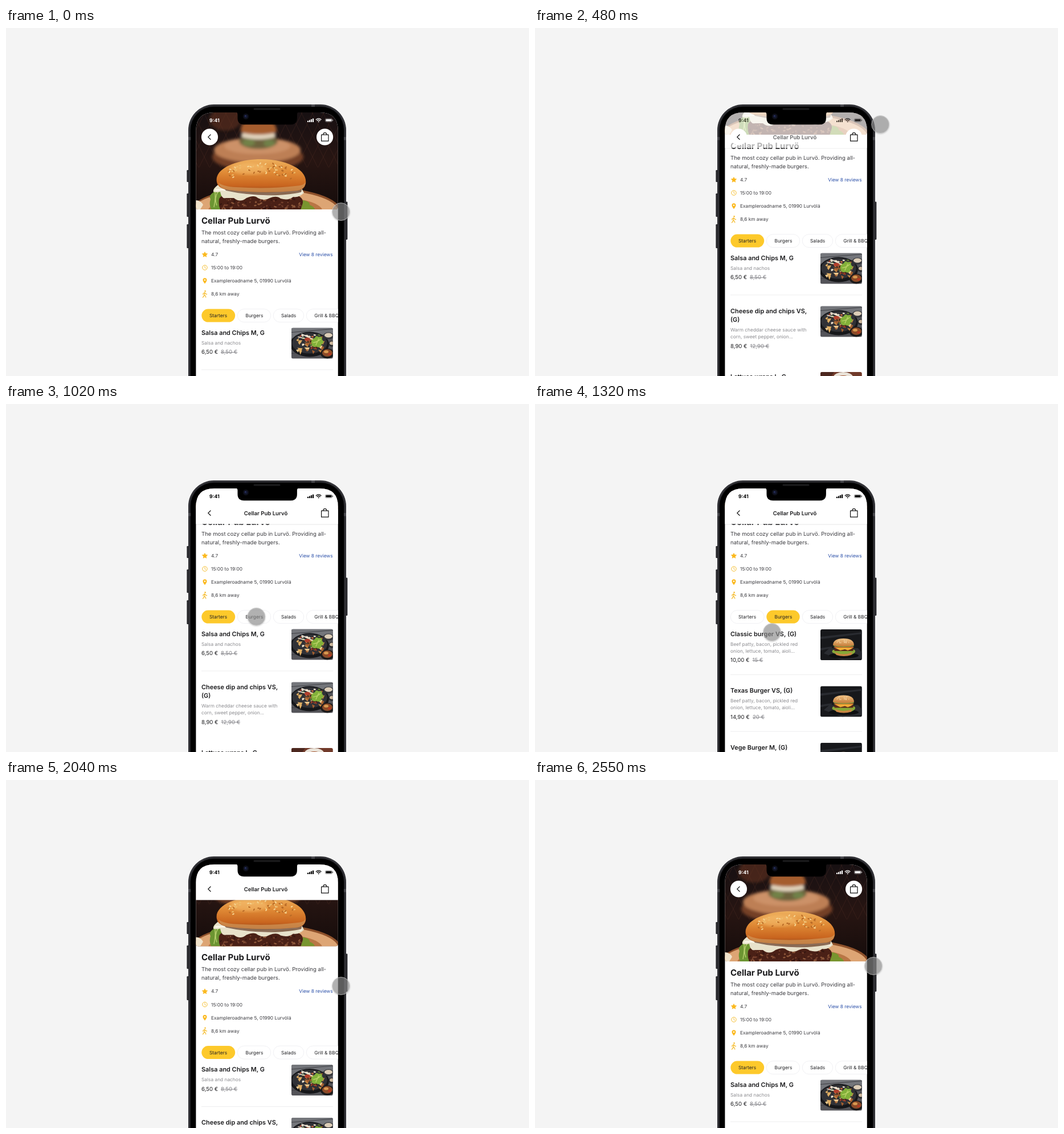
Animation of 918x610 px, one loop 2580 ms. Source, as an HTML page:

```html
<!DOCTYPE html>
<html lang="en">
<head>
<meta charset="utf-8">
<title>Restaurant menu prototype</title>
<style>
  html, body { margin: 0; width: 100%; height: 100%; overflow: hidden; background: #f4f4f4; }
  svg { display: block; }
  text { font-family: Inter, sans-serif; font-size: 8.33px; fill: #3c3c40; text-rendering: geometricPrecision; white-space: pre; }
  .title { font-size: 15px; font-weight: 700; fill: #1b1b1d; }
  .body { font-size: 9.6px; }
  .bar { font-size: 9.6px; font-weight: 600; fill: #1b1b1d; }
  .clock { font-size: 8.7px; font-weight: 700; fill: inherit; }
  .link { fill: #2a4fa8; }
  .name { font-size: 10.9px; font-weight: 600; fill: #1b1b1d; }
  .note { fill: #8c8c90; }
  .price { font-size: 9.6px; fill: #1f1f22; }
  .old { font-size: 9.6px; fill: #85858a; text-decoration: line-through; }
  .tab { fill: #222225; }
</style>
</head>
<body>
<svg id="stage" width="918" height="610" viewBox="0 0 918 610" xmlns="http://www.w3.org/2000/svg"></svg>
<script>
const LOOP = 2580, FRAME = 30, MAX_SCROLL = 131;
const YELLOW = '#fdc92b';

let seed = 7;
const rnd = (a, b) => {
  seed = (seed * 16807) % 2147483647;
  return a + (b - a) * seed / 2147483647;
};
const repeat = (n, fn) => Array.from({ length: n }, (_, i) => fn(i)).join('');
const text = (cls, x, y, s) => `<text class="${cls}" x="${x}" y="${y}">${s}</text>`;
const path = (d, fill, more = '') => `<path d="${d}" fill="${fill}" ${more}/>`;
const line = (d, color, w, more = '') =>
  `<path d="${d}" fill="none" stroke="${color}" stroke-width="${w}" stroke-linecap="round" stroke-linejoin="round" ${more}/>`;
const rect = (x, y, w, h, r, fill, more = '') =>
  `<rect x="${x}" y="${y}" width="${w}" height="${h}" rx="${r}" fill="${fill}" ${more}/>`;
const oval = (x, y, rx, ry, fill, more = '') =>
  `<ellipse cx="${x}" cy="${y}" rx="${rx}" ry="${ry}" fill="${fill}" ${more}/>`;
const speck = (x, y, rx, ry, fill) =>
  oval(x.toFixed(1), y.toFixed(1), rx, ry, fill, `transform="rotate(${rnd(-60, 60).toFixed()} ${x.toFixed(1)} ${y.toFixed(1)})"`);
const pick = list => list[Math.floor(rnd(0, list.length))];

// Large picture above the menu
function hero() {
  const lattice = repeat(16, i => {
    const x = 330 + i * 19;
    return line(`M${x} 148l-48 96M${x - 40} 148l48 96`, '#5b3328', 0.8, 'opacity=".4"');
  });
  const seeds = repeat(62, () => {
    const a = rnd(-1, 1), k = rnd(0, 1);
    return speck(447 + a * 60, 235 + a * a * 15 + k * 20, 2.1, 1.1, pick(['#f7d796', '#edbd6c', '#b86a26']));
  });
  const crumbs = repeat(80, () =>
    speck(rnd(377, 517), rnd(299, 318), rnd(1, 3.5).toFixed(1), 1.3, pick(['#74402c', '#351610', '#8c5639', '#4e241a'])));
  return `<g clip-path="url(#heroClip)">
    ${rect(333, 148, 250, 170, 0, 'url(#night)')}${lattice}
    <g filter="url(#blur)">
      ${oval(385, 160, 28, 20, '#713a20', 'opacity=".5"')}
      ${oval(442, 226, 80, 24, '#754126')}${oval(441, 214, 76, 22, '#bd7f54')}
      ${oval(441, 207, 58, 14, '#cc9167')}
      ${oval(443, 198, 34, 14, '#6d633c')}${oval(426, 201, 11, 6, '#728247')}${oval(462, 202, 10, 6, '#708148')}
      ${oval(443, 188, 31, 7, '#e2d4bd')}
      ${path('M412 183q-2-24 31-24t32 24q-31 8-63 0z', '#a55d2e')}
    </g>
    ${oval(456, 322, 132, 43, '#8e512b')}${oval(455, 321, 128, 38, '#dda574')}
    ${oval(455, 320, 100, 25, '#b97645')}
    ${path('M333 302q9 0 13 8l-5 8h-8z', '#f0e3cb')}
    ${path('M373 277q-10 2-9 11-9 6-5 12-3 9 1 18h24l-4-38z', '#6c9532')}
    ${path('M366 283q3 13-1 31M372 287q-7 11-2 24', 'none', 'stroke="#b3cc6a" stroke-width="1.5"')}
    ${path('M521 302q13 2 12 8 8 3 9 8h-30z', '#78952f')}
    ${path('M374 300q4-12 34-9l100 1q17 6 12 18l-4 12H378q-6-10-4-22z', '#4a2016')}
    ${crumbs}
    ${path('M372 275q-9 7-8 12 6 2 12 0 2 13 10 11 8 0 14 0 11 9 22 0 14-6 20 0 11 6 21 0 12-5 19 1 14 4 22-3 10 2 19-7l-5-10q-72-13-146-4z', '#e8e2cb')}
    ${path('M367 284q26-2 50 5 30 7 63-1 22-4 39 1', 'none', 'stroke="#fffdf1" stroke-width="3" opacity=".8"')}
    ${path('M381 279q57 16 139 1l-2 8q-64 12-132-3z', '#5f351f', 'opacity=".7"')}
    ${path('M370 270C365 246 406 230 448 230s82 17 78 43q-2 10-14 12-62 6-120-1-20-2-22-14z', 'url(#bun)')}
    ${path('M373 271q9 7 31 8 60 4 112-3 7-1 10-6-1 12-14 15-62 6-120-1-17-2-19-13z', '#d19556', 'opacity=".75"')}
    ${oval(427, 247, 33, 10, '#ffd184', 'opacity=".4" filter="url(#blur)"')}
    ${seeds}
  </g>`;
}

// 73 x 54 dish pictures
function nachos() {
  const chips = repeat(24, () => {
    const x = rnd(8, 52), y = rnd(15, 41);
    return path(`M${x.toFixed(1)} ${y.toFixed(1)}l${rnd(5, 11).toFixed(1)} ${rnd(-4, 3).toFixed(1)}l-3 ${rnd(4, 8).toFixed(1)}z`,
      pick(['#dfad63', '#c48542', '#ecc88c', '#a7602f']));
  });
  const bits = repeat(38, () =>
    speck(rnd(13, 50), rnd(12, 37), 2.2, 1.2, pick(['#a33b25', '#f1e4cf', '#d26c40', '#658637', '#42251b'])));
  return rect(0, 0, 73, 54, 0, '#545459') + path('M0 0h73v10L0 18z', '#74767b') +
    line('M0 8L73 2M0 28L73 18M0 45L73 38', '#3d3e43', 1) +
    oval(32, 29, 34, 22, '#16171a') + oval(32, 27, 31, 18, '#303136') + chips + bits +
    path('M35 26q-1-7 6-8 2-6 7-2 6-2 6 5 5 4-1 8-3 8-9 4-8 3-9-7z', '#83b13a') +
    line('M38 26q8-1 13-6M43 30l5-11', '#c0d66c', 1.2) +
    line('M12 16l20 5M18 11l19 9', '#f4ead9', 1.6) + oval(28, 20, 5, 3, '#b33f2c') +
    oval(65, 14, 9, 6, '#34353a') + oval(65, 13, 7, 4, '#dccdb7') +
    oval(71, 28, 6, 5, '#28292d') + oval(71, 27, 4, 3, '#cfb99d') +
    oval(63, 45, 12, 9, '#1b1a1b') + oval(63, 44, 9, 6.5, '#8b4b28') +
    oval(61, 42, 4, 2.5, '#d99a51') + oval(67, 46, 3, 2, '#b53a22');
}

function burger() {
  const seeds = repeat(20, () => speck(rnd(29, 52), rnd(18, 24), 0.8, 0.5, '#f8deb0'));
  return rect(0, 0, 73, 54, 0, '#17181b') + path('M0 13L73 5v3L0 17zM0 33l20-3v3L0 37z', '#292b30') +
    path('M6 42l10-9h50l7 8v10L38 54z', '#2a2c31') + oval(41, 46, 26, 5, '#0e0f11') +
    path('M22 36q-4 4 2 6 7 4 17 3 13 2 19-4 3-4-2-6z', '#86a837') +
    path('M25 40q15 7 31 0l-2 5q-13 4-26 0z', '#c98543') +
    rect(24, 33, 34, 5, 2.5, '#57281a') + path('M23 31h36l-6 4-5 2-5-2-8 2z', '#f0ad35') +
    rect(25, 29.5, 32, 2.4, 1, '#b4402a') + line('M24 29q17 3 34 0', '#83a441', 1.6) +
    path('M22 28q0-12 18.500-12t18.500 12q-18 4-37 0z', 'url(#smallBun)') + seeds;
}

function wraps() {
  return rect(0, 0, 73, 54, 0, '#713a2a') + path('M0 0h24l-8 12H0z', '#4c271f') +
    oval(40, 9, 17, 9, '#e9e2d8') + oval(40, 12, 12, 6, '#a4522f') + path('M10 30h50l8 24H4z', '#87a043');
}

const starters = [
  { top: 525.5, name: ['Salsa and Chips M, G'], note: ['Salsa and nachos'], price: '6,50 €', old: '8,50 €', oldX: 377, pic: 'nachos', rule: 599 },
  { top: 618.5, name: ['Cheese dip and chips VS,', '(G)'], note: ['Warm cheddar cheese sauce with', 'corn, sweet pepper, onion...'], price: '8,90 €', old: '12,90 €', oldX: 377.5, pic: 'nachos' },
  { top: 734, name: ['Lettuce wraps L, G'], note: [], pic: 'wraps' }
];
const patties = ['Beef patty, bacon, pickled red', 'onion, lettuce, tomato, aioli...'];
const burgers = [
  { top: 526, name: ['Classic burger VS, (G)'], note: patties, price: '10,00 €', old: '15 €', oldX: 381.5, pic: 'burger', rule: 605.5 },
  { top: 625.4, name: ['Texas Burger VS, (G)'], note: patties, price: '14,90 €', old: '20 €', oldX: 382, pic: 'burger', rule: 705 },
  { top: 724.8, name: ['Vege Burger M, (G)'], note: [], pic: 'burger' }
];

function dish({ top, name, note, price, old, oldX, pic, rule }) {
  let y = top + 12, out = '';
  name.forEach((s, i) => out += text('name', 343, y + i * 15.6, s));
  y += (name.length - 1) * 15.6 + 17;
  note.forEach((s, i) => out += text('note', 343, y + i * 11.6, s));
  y += (note.length - 1) * 11.6 + 16.8;
  if (price) out += text('price', 343, y, price) + text('old', oldX, y, old);
  if (rule) out += rect(343, rule - 0.5, 231, 0.9, 0, '#ececee');
  return out + `<g transform="translate(501 ${top})" clip-path="url(#thumb)"><use href="#${pic}"/></g>`;
}

const tabs = [['Starters', 343, 59.5, 357], ['Burgers', 406, 59, 420.5], ['Salads', 469, 54, 483], ['Grill &amp; BBQ', 527, 80, 541.3]];
const tabRow = active => tabs.map(([s, x, w, tx], i) =>
  rect(x + 0.3, 492.6, w - 0.6, 23, 11.5, i === active ? YELLOW : '#fff', i === active ? '' : 'stroke="#ededf0" stroke-width=".8"') +
  text('tab', tx, 507.3, s)).join('');

const starPath = 'M' + Array.from({ length: 10 }, (_, i) => {
  const r = i % 2 ? 2.7 : 5.6, a = i * Math.PI / 5;
  return `${(349 + r * Math.sin(a)).toFixed(2)} ${(397.3 - r * Math.cos(a)).toFixed(2)}`;
}).join('L') + 'Z';

const details =
  text('title', 343, 342.7, 'Cellar Pub Lurvö') +
  text('body', 343, 361.8, 'The most cozy cellar pub in Lurvö. Providing all-') +
  text('body', 343, 376.6, 'natural, freshly-made burgers.') +
  path(starPath, '#fbb91f') + text('', 360, 399.8, '4.7') +
  `<text class="link" x="573.6" y="399.8" text-anchor="end">View 8 reviews</text>` +
  `<circle cx="349" cy="420" r="4.2" fill="none" stroke="#f5bf32" stroke-width="1"/>` +
  line('M349 417.500v2.700l1.800 1', '#f5bf32', 0.9) + text('', 360, 423, '15:00 to 19:00') +
  path('M349 448.200q-3.500-4.300-3.500-6.400a3.500 3.500 0 0 1 7 0q0 2.100-3.500 6.400zM349 440.400a1.300 1.300 0 1 0 0 2.600 1.300 1.300 0 0 0 0-2.600z', '#fbb91f', 'fill-rule="evenodd"') +
  text('', 360, 446, 'Exampleroadname 5, 01990 Lurvölä') +
  oval(349.6, 461.3, 1.3, 1.3, '#f5bb2b') +
  line('M348.800 463.800l-.8 4 2.200 2 .6 2.400M348 467.800l-.7 2.200-1.900 2.200M348.800 463.800l-2.600 1.400-.4 2M349 463.900l1.600 2.300 2 .5', '#f5bb2b', 1.2) +
  text('', 360, 469, '8,6 km away');

const status = (id, color) => `<g id="${id}" fill="${color}">
  ${text('clock', 357, 165.2, '9:41')}
  ${repeat(4, i => `<rect x="${529 + i * 3}" y="${162.6 - i * 1.4}" width="2.1" height="${2.4 + i * 1.4}" rx=".6"/>`)}
  ${line('M544.400 160.500q4.300-3.600 8.600 0M546.100 162.300q2.600-2.100 5.200 0', color, 1.3)}
  <circle cx="548.700" cy="164.200" r="1"/>
  <rect x="560.400" y="158.800" width="12.200" height="5.800" rx="1.800" fill="none" stroke="${color}" stroke-width=".6" opacity=".6"/>
  <rect x="561.400" y="159.800" width="10.200" height="3.800" rx="1"/><rect x="573.200" y="160.600" width=".8" height="2.200" rx=".4"/>
</g>`;

const gradient = (id, stops) => `<linearGradient id="${id}" x2="0" y2="1">` +
  stops.map(([o, c]) => `<stop offset="${o}" stop-color="${c}"/>`).join('') + '</linearGradient>';

const stage = document.getElementById('stage');
stage.innerHTML = `<defs>
  ${gradient('night', [[0, '#171012'], [.5, '#271512'], [1, '#150c0b']])}
  ${gradient('bun', [[0, '#eeb05d'], [.4, '#e08b36'], [.8, '#c9651f'], [1, '#94451a']])}
  ${gradient('smallBun', [[0, '#efc184'], [1, '#c47b38']])}
  ${gradient('fall', [[0, '#000', ], [1, '#fff']])}
  <filter id="blur"><feGaussianBlur stdDeviation="2.6"/></filter>
  <filter id="soft" x="-30%" y="-30%" width="160%" height="160%"><feGaussianBlur stdDeviation="1.3"/></filter>
  <clipPath id="screen"><path d="M333.400 620V180q0-32 32-32h185.400q32 0 32 32v440z"/></clipPath>
  <clipPath id="heroClip"><path d="M333 148h250v165q0 5-5 5H338q-5 0-5-5z"/></clipPath>
  <clipPath id="thumb"><rect width="72.800" height="54.200" rx="3"/></clipPath>
  <g id="nachos">${nachos()}</g><g id="burger">${burger()}</g><g id="wraps">${wraps()}</g>
</defs>
${rect(0, 0, 918, 610, 0, '#f4f4f4')}
${[[317.4, 249, 21], [317.4, 290, 41], [317.4, 344, 42], [595.6, 304.5, 66.5]].map(([x, y, h]) => rect(x, y, 3.8, h, 1.2, '#29292d')).join('')}
${rect(320, 134, 277, 560, 45, '#242428')}
${rect(321, 135, 275, 560, 44, '#3b3b40')}
${rect(322.2, 136.2, 272.6, 560, 43, '#222226')}
${rect(324, 138, 269, 560, 41, '#000')}
${rect(536, 134, 6, 4, 0, '#4b4b50')}${rect(320, 191, 4, 5.5, 0, '#47474c')}${rect(593, 191, 4, 5.5, 0, '#47474c')}
<g clip-path="url(#screen)">
  ${rect(333, 148, 251, 470, 0, '#fff')}
  <g id="page">${hero()}${details}
    <g id="starterList">${tabRow(0)}${starters.map(dish).join('')}</g>
    <g id="burgerList">${tabRow(1)}${burgers.map(dish).join('')}</g>
  </g>
  <circle cx="357.500" cy="191" r="14.600" fill="#fff"/><circle cx="559.600" cy="191" r="14.600" fill="#fff"/>
  ${status('light', '#fff')}
  <g id="bar">
    ${rect(333, 148, 251, 64, 0, '#000', 'opacity=".06"')}${rect(333, 148, 251, 62.4, 0, '#fff')}
    <text class="bar" x="456" y="194.800" text-anchor="middle">Cellar Pub Lurvö</text>
    ${status('dark', '#000')}
  </g>
  ${line('M359 187l-4.200 4.100 4.200 4.100', '#111', 1.3)}
  ${line('M553.600 187.200h12.400v11h-12.400zM556.700 187.200q0-3.600 3.100-3.600t3.100 3.600', '#111', 1.2)}
</g>
${path('M402 147q4.500 0 4.500 4.500V158q0 11.200 11.200 11.200h82q11.200 0 11.200-11.200v-6.500q0-4.500 4.500-4.500z', '#000')}
${rect(434.500, 140.600, 47, 3, 1.500, '#1c1c1e')}
${oval(421, 155, 5.200, 5.200, '#0d0e16')}${oval(421, 155, 3, 3, '#151a33')}${oval(420.300, 154.200, 1, 1, '#35407c')}
<g id="pointer">
  <circle r="16" cy="1" fill="#000" opacity=".16" filter="url(#soft)"/>
  <circle r="15.500" fill="#9a9a9a" fill-opacity=".6" stroke="#d6d6d6" stroke-opacity=".75" stroke-width=".9"/>
</g>`;

// Pointer path: time, x, y
const track = [
  [0, 588, 322], [90, 588, 317], [270, 592, 263], [400, 601, 186], [540, 609, 164], [590, 610, 170],
  [750, 567, 276], [930, 460, 362], [1050, 437, 374], [1170, 435, 375], [1320, 416, 400],
  [1440, 376, 378], [1530, 374, 375], [1650, 578, 230], [1695, 594, 208], [1770, 595, 252],
  [2040, 588, 361], [2150, 587, 390], [2240, 588, 391], [2400, 593, 348], [2550, 594, 326], [2580, 592, 324]
];

// Monotone cubic through the track
function slope(i, k) {
  if (i === 0 || i === track.length - 1) return 0;
  const [p, q, r] = [track[i - 1], track[i], track[i + 1]];
  const a = (q[k] - p[k]) / (q[0] - p[0]), b = (r[k] - q[k]) / (r[0] - q[0]);
  return a * b <= 0 ? 0 : 2 * a * b / (a + b);
}
function along(t, k) {
  const i = Math.max(0, track.findIndex(p => p[0] > t) - 1);
  const p = track[i], q = track[i + 1], h = q[0] - p[0], u = (t - p[0]) / h;
  const v = 1 - u;
  return p[k] * (1 + 2 * u) * v * v + q[k] * u * u * (3 - 2 * u) + h * u * v * (slope(i, k) * v - slope(i + 1, k) * u);
}

const clamp = (v, a, b) => Math.min(b, Math.max(a, v));

// The page follows the pointer while it is dragged
function scrollAt(t) {
  if (t < 540) return clamp(314.4 - along(t, 2), 0, MAX_SCROLL);
  if (t < 1695) return MAX_SCROLL;
  if (t < 2150) return clamp(MAX_SCROLL - (along(t, 2) - 256.5), 0, MAX_SCROLL);
  return 0;
}

const [page, bar, light, pointer, starterList, burgerList] =
  ['page', 'bar', 'light', 'pointer', 'starterList', 'burgerList'].map(id => document.getElementById(id));

function draw(now) {
  let t = Math.floor((now % LOOP) / FRAME) * FRAME;
  if (t < 60) t = 0;
  const shown = clamp((t - 420) / 90, 0, 1) * clamp((2340 - t) / 90, 0, 1);
  const onBurgers = t >= 1110 && t < 1530;
  page.setAttribute('transform', `translate(0 ${-scrollAt(t)})`);
  pointer.setAttribute('transform', `translate(${along(t, 1)} ${along(t, 2)})`);
  bar.setAttribute('opacity', shown);
  light.setAttribute('opacity', 1 - shown);
  starterList.style.display = onBurgers ? 'none' : '';
  burgerList.style.display = onBurgers ? '' : 'none';
}

const start = performance.now();
function tick() {
  draw(performance.now() - start);
  requestAnimationFrame(tick);
}
tick();
</script>
</body>
</html>
```
